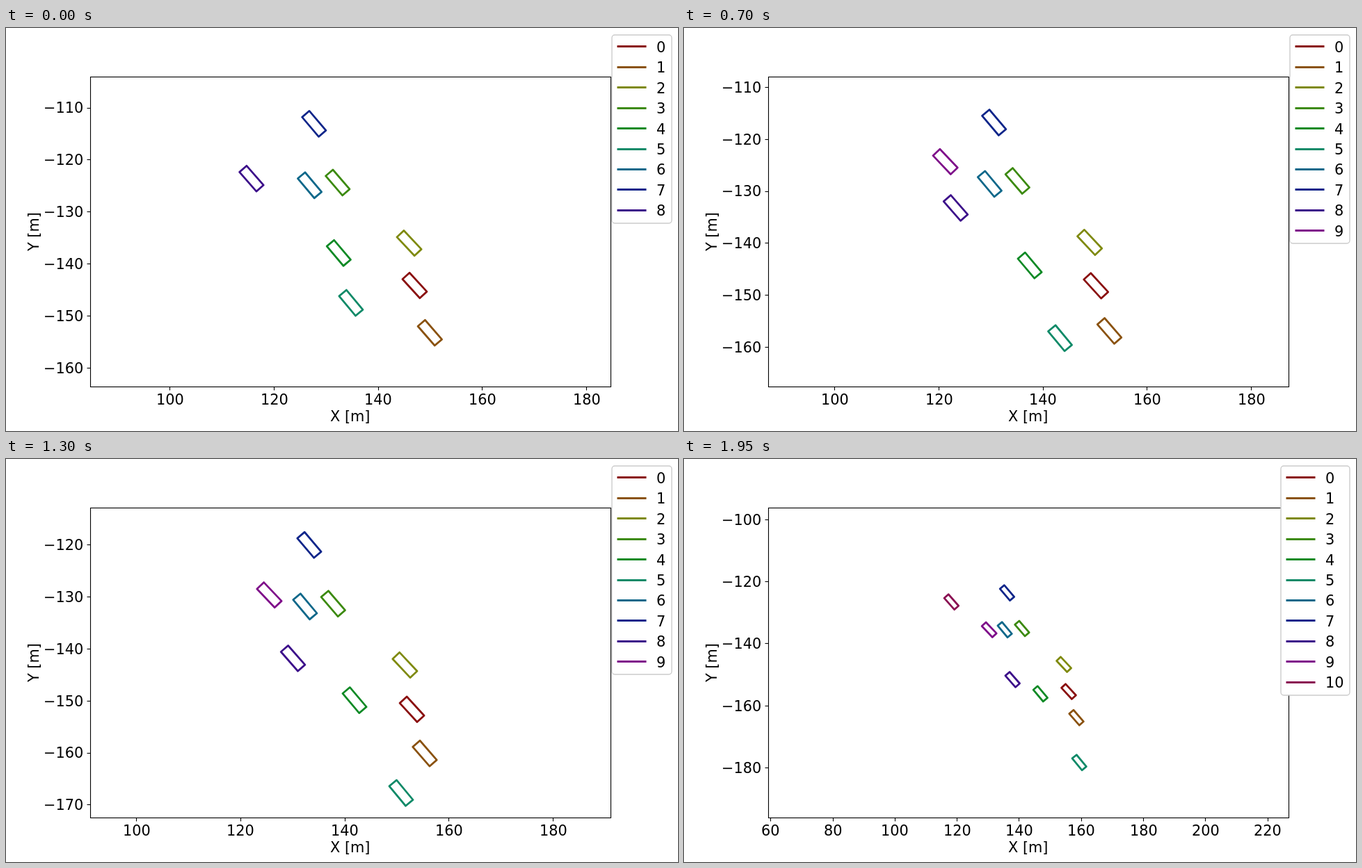
An HTML page with a canvas that plays this animation: 966x580 px, repeating every 2 s.

```html
<!DOCTYPE html>
<html lang="en">
<head>
<meta charset="utf-8">
<title>Vehicle tracks</title>
<style>
  html, body { margin: 0; width: 966px; height: 580px; overflow: hidden; background: #fff; }
  canvas { display: block; }
</style>
</head>
<body>
<canvas id="plot" width="966" height="580"></canvas>
<script>
const ctx = document.getElementById('plot').getContext('2d');
const STEP = 50, STEPS = 40, LAST = 39, MID = 19;
const AX = { left: 121.2, right: 869.8, top: 70.2, bottom: 516.8 };
const FONT = '20.83px "DejaVu Sans", Verdana, sans-serif';
const LENGTH = 4.93, WIDTH = 1.83;

// Position in metres at the first, middle and last step; heading in degrees; entry step.
const cars = [
  { x: [146.99, 151.29, 155.90], y: [-144.12, -149.59, -155.42], dir: 47.5 },
  { x: [149.91, 153.80, 158.38], y: [-153.23, -158.17, -163.81], dir: 49 },
  { x: [145.93, 150.02, 154.35], y: [-136.00, -141.18, -146.68], dir: 46.8 },
  { x: [132.20, 136.17, 140.88], y: [-124.35, -129.35, -135.10], dir: 49.3 },
  { x: [132.41, 139.27, 146.79], y: [-137.89, -146.56, -156.15], dir: 49.8 },
  { x: [134.76, 146.37, 159.30], y: [-147.48, -162.14, -178.28], dir: 50.3 },
  { x: [126.83, 130.82, 135.33], y: [-124.86, -129.93, -135.50], dir: 50 },
  { x: [127.66, 131.65, 136.07], y: [-113.05, -118.11, -123.61], dir: 49.7 },
  { x: [115.66, 126.02, 137.82], y: [-123.58, -136.74, -151.55], dir: 48.8 },
  { x: [116.44, 122.98, 130.30], y: [-118.14, -126.51, -135.50], dir: 46.5, from: 3 },
  { x: [93.96, 105.74, 118.14], y: [-98.46, -112.14, -126.54], dir: 48.5, from: 33 }
];

const color = i => `hsl(${i * 360 / 11}, 80%, 30%)`;
const mean = list => list.reduce((a, b) => a + b, 0) / list.length;
const snap = v => Math.floor(v) + 0.5;

// Quadratic through the three key positions.
function along([a, b, c], k) {
  const s1 = (b - a) / MID, s2 = (c - b) / (LAST - MID);
  return a + s1 * k + (s2 - s1) / LAST * k * (k - MID);
}

function line(x1, y1, x2, y2) {
  ctx.beginPath();
  ctx.moveTo(x1, y1);
  ctx.lineTo(x2, y2);
  ctx.stroke();
}

// Text on whole pixels; anchor 0 is left, 0.5 centre, 1 right.
function text(str, x, y, anchor) {
  const left = x - ctx.measureText(str).width * anchor;
  ctx.fillText(str, Math.round(left), Math.round(y));
}

function drawCar(x, y, dir, scale, stroke) {
  ctx.save();
  ctx.translate(x, y);
  ctx.rotate(dir * Math.PI / 180);
  ctx.strokeStyle = stroke;
  ctx.lineWidth = 2.78;
  ctx.lineJoin = 'round';
  ctx.strokeRect(-LENGTH * scale / 2, -WIDTH * scale / 2, LENGTH * scale, WIDTH * scale);
  ctx.restore();
}

function drawAxes(toX, toY, yStep) {
  const left = snap(AX.left), top = snap(AX.top), bottom = snap(AX.bottom);
  ctx.strokeStyle = ctx.fillStyle = '#000';
  ctx.lineWidth = 1.11;
  for (let v = 0; v <= 300; v += 20) {
    const x = toX(v);
    if (x < AX.left || x > AX.right) continue;
    line(snap(x), bottom, snap(x), bottom + 5);
    text(v, x, 542, 0.5);
  }
  for (let v = 0; v <= 300; v += yStep) {
    const y = toY(-v);
    if (y < AX.top || y > AX.bottom) continue;
    line(left - 5, snap(y), left, snap(y));
    text('\u2212' + v, 111, y + 7.4, 1);
  }
  ctx.strokeRect(left, top, snap(AX.right) - left, bottom - top);
  text('X [m]', 495.1, 566, 0.5);
  ctx.save();
  ctx.translate(47, 293);
  ctx.rotate(-Math.PI / 2);
  text('Y [m]', 0, 0, 0.5);
  ctx.restore();
}

function drawLegend(count) {
  const left = count > 10 ? 858 : 871, top = 10;
  const rowY = i => 26.9 + 29.43 * i;
  const bottom = Math.round(rowY(count - 1) + 18.7);
  ctx.beginPath();
  ctx.roundRect(left, top, 957 - left, bottom - top, 4.17);
  ctx.fillStyle = '#fff';
  ctx.strokeStyle = '#ccc';
  ctx.lineWidth = 1.39;
  ctx.fill();
  ctx.stroke();
  ctx.fillStyle = '#000';
  for (let i = 0; i < count; i++) {
    const y = snap(rowY(i));
    ctx.strokeStyle = color(i);
    ctx.lineWidth = 2.78;
    line(left + 7.5, y, left + 49.5, y);
    text(i, left + 64, rowY(i) + 7.9, 0);
  }
}

function draw(k) {
  const seen = cars.filter(c => k >= (c.from || 0))
    .map(c => ({ x: along(c.x, k), y: along(c.y, k), dir: c.dir }));
  const wide = seen.length > 10;
  const scale = (wide ? AX.bottom - AX.top : AX.right - AX.left) / 100;
  const cx = mean(seen.map(c => c.x)), cy = mean(seen.map(c => c.y));
  const toX = x => (AX.left + AX.right) / 2 + (x - cx) * scale;
  const toY = y => (AX.top + AX.bottom) / 2 - (y - cy) * scale;

  ctx.fillStyle = '#fff';
  ctx.fillRect(0, 0, 966, 580);
  ctx.font = FONT;
  ctx.save();
  ctx.beginPath();
  ctx.rect(AX.left, AX.top, AX.right - AX.left, AX.bottom - AX.top);
  ctx.clip();
  seen.forEach((c, i) => drawCar(toX(c.x), toY(c.y), c.dir, scale, color(i)));
  ctx.restore();
  drawAxes(toX, toY, wide ? 20 : 10);
  drawLegend(seen.length);
}

const start = performance.now();
function tick() {
  draw(Math.floor((performance.now() - start) / STEP) % STEPS);
  requestAnimationFrame(tick);
}
tick();
</script>
</body>
</html>
```
